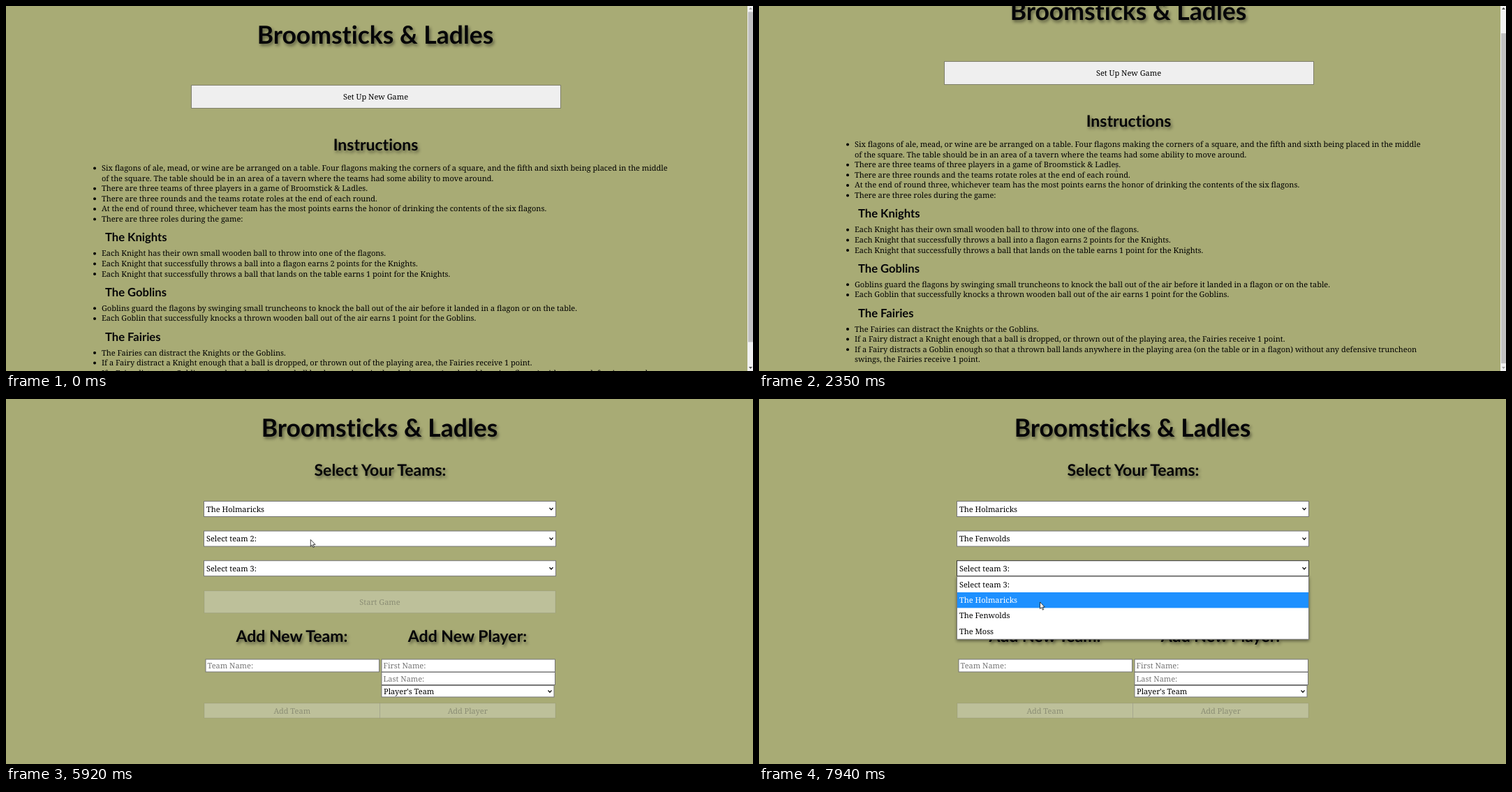
Recreate the animation shown at these times as an HTML page. Size 1070 by 523 pixels, loop 8000 ms.

```html
<!DOCTYPE html>
<html lang="en">
<head>
<meta charset="utf-8">
<title>Broomsticks &amp; Ladles</title>
<style>
html, body { margin: 0; width: 100%; height: 100%; overflow: hidden; background: #a8ab75; }
svg { display: block; width: 1070px; height: 523px; }
text { font: 11px "Noto Serif", serif; text-rendering: geometricPrecision; fill: #000; }
.mid { text-anchor: middle; }
.h1, .h2, .h3 { font: 700 35.5px Lato, sans-serif; font-variant-ligatures: none; fill: #050508; }
.h2 { font-size: 23px; }
.h3 { font-size: 16.6px; }
.h1, .h2 { text-anchor: middle; filter: drop-shadow(2px 3px 2px rgba(0, 0, 0, .45)); }
.hint { fill: #757575; }
.off { fill: #8b8d74; }
.lit { fill: #fff; }
.menu { filter: drop-shadow(0 2px 2px rgba(0, 0, 0, .45)); }
</style>
</head>
<body>
<svg id="stage" viewBox="0 0 1070 523"></svg>
<script>
const LOOP = 8000;
const stage = document.getElementById('stage');

const text = (x, y, s, cls = '') => `<text x="${x}" y="${y}" class="${cls}">${s}</text>`;
const rect = (x, y, w, h, fill, line = 'none') =>
  `<rect x="${x}" y="${y}" width="${w}" height="${h}" fill="${fill}" stroke="${line}"/>`;
const path = (d, attrs) => `<path d="${d}" ${attrs}/>`;

// [first baseline, lines]; a leading space marks a wrapped line without bullet
const sections = [
  [236, [
    'Six flagons of ale, mead, or wine are be arranged on a table. Four flagons making the corners of a square, and the fifth and sixth being placed in the middle',
    ' of the square. The table should be in an area of a tavern where the teams had some ability to move around.',
    'There are three teams of three players in a game of Broomstick &amp; Ladles.',
    'There are three rounds and the teams rotate roles at the end of each round.',
    'At the end of round three, whichever team has the most points earns the honor of drinking the contents of the six flagons.',
    'There are three roles during the game:']],
  [358.3, [
    'Each Knight has their own small wooden ball to throw into one of the flagons.',
    'Each Knight that successfully throws a ball into a flagon earns 2 points for the Knights.',
    'Each Knight that successfully throws a ball that lands on the table earns 1 point for the Knights.'],
    'The Knights'],
  [436.8, [
    'Goblins guard the flagons by swinging small truncheons to knock the ball out of the air before it landed in a flagon or on the table.',
    'Each Goblin that successfully knocks a thrown wooden ball out of the air earns 1 point for the Goblins.'],
    'The Goblins'],
  [500.5, [
    'The Fairies can distract the Knights or the Goblins.',
    'If a Fairy distract a Knight enough that a ball is dropped, or thrown out of the playing area, the Fairies receive 1 point.',
    'If a Fairy distracts a Goblin enough so that a thrown ball lands anywhere in the playing area (on the table or in a flagon) without any defensive truncheon',
    ' swings, the Fairies receive 1 point.'],
    'The Fairies']];

const rules = sections.map(([top, lines, head]) =>
  (head ? text(142, top - 21, head, 'h3') : '') +
  lines.map((s, i) => {
    const y = top + i * 14.6;
    const dot = s[0] === ' ' ? '' : `<circle cx="127" cy="${y - 3.5}" r="2"/>`;
    return dot + text(137, y, s.trim());
  }).join('')).join('');

const title = x => text(x, 54, 'Broomsticks &amp; Ladles', 'h1');

// Cursor moves: start, end, steps, x, y
const moves = [
  [460, 460, 1, 900, 443], [527, 860, 6, 545, 99], [930, 1060, 3, 524, 132],
  [1680, 1750, 2, 523, 157], [1840, 2000, 3, 512, 232],
  [3010, 3420, 7, 522, 92], [3900, 4110, 4, 522, 127], [4310, 4590, 5, 505, 156],
  [4910, 5300, 6, 448, 188], [5370, 5580, 4, 440, 206],
  [5720, 5930, 4, 435, 200], [6130, 6460, 6, 427, 258], [6540, 6730, 4, 425, 262],
  [7080, 7300, 4, 415, 243], [7540, 7870, 6, 403, 290], [7940, 7940, 1, 402.5, 291]];

function stepsDone(t, start, end, n) {
  if (t < start) return 0;
  return end > start ? Math.min(n, 1 + Math.floor((t - start) / (end - start) * (n - 1) + 1e-6)) : n;
}

function cursorAt(t) {
  let x = 900, y = 443;
  for (const [start, end, n, tx, ty] of moves) {
    const p = stepsDone(t, start, end, n) / n;
    x += (tx - x) * p;
    y += (ty - y) * p;
  }
  return [x, y];
}

function cursor(t, [x, y]) {
  if (t < 460) return '';
  const beam = t >= 1920 && t < 3100 || t >= 3630 && t < 4000;
  const shape = beam
    ? path('M-2-5Q0-5 0-4Q0-5 2-5M0-4V4M-2 5Q0 5 0 4Q0 5 2 5', 'fill="none" stroke="#555" stroke-width=".8"')
    : path('M0 0V9.6L2.2 7.6 3.8 11.2 5.3 10.5 3.7 7.1H6.8Z', 'fill="#fff" stroke="#111" stroke-width=".8"');
  return `<g transform="translate(${x.toFixed(1)} ${y.toFixed(1)})">${shape}</g>`;
}

function home(t, [x, y]) {
  const scroll = [0, 4.5, 17, 29.5, 34][stepsDone(t, 2140, 2350, 4)];
  const top = 113.5 - scroll;
  const hover = t >= 460 && x > 265 && x < 795 && y > top && y < top + 33;
  return `<g transform="translate(0 ${-scroll})">` + title(529) +
    rect(265.5, 113.5, 529, 33, hover ? '#e5e5e5' : '#efefef', '#80806c') +
    text(529.5, 134, 'Set Up New Game', 'mid') +
    text(529.5, 207, 'Instructions', 'h2') + rules + '</g>' +
    rect(1062, 0, 8, 523, '#f1f1f1') +
    rect(1063, 8.5 + scroll * .9, 7, 473, '#c1c1c1') +
    path('M1064 5l2.5-3 2.5 3z', `fill="${scroll ? '#505050' : '#a3a3a3'}"`) +
    path('M1064 517l2.5 3 2.5-3z', `fill="${scroll < 34 ? '#505050' : '#a3a3a3'}"`);
}

const teams = ['The Holmaricks', 'The Fenwolds', 'The Moss'];
// Open time, close time, chosen row, times at which the highlight moves down
const menus = [
  [4910, 5650, 1, [5450]],
  [6000, 6940, 2, [6330, 6540]],
  [7400, LOOP, 0, [7700]]];

const chevron = (x, y) => path(`M${x - 2.5} ${y - 1.5}l2.5 2.8 2.5-2.8`, 'fill="none" stroke="#111" stroke-width="1.3"');
const field = (x, y, label) => rect(x, y, 248.5, 18, '#fff', '#767676') + text(x + 2.5, y + 13, label, 'hint');
const disabled = (x, y, w, h, label) =>
  rect(x, y, w, h, 'rgba(239,239,239,.3)', 'rgba(118,118,118,.2)') +
  text(x + w / 2, y + h / 2 + 4, label, 'mid off');

function picker(t, i) {
  const [open, close, choice] = menus[i];
  const y = 146.5 + i * 42.6;
  const label = t >= close ? teams[choice - 1] : `Select team ${i + 1}:`;
  return rect(283.5, y, 504, 22, '#fff', t >= open && t < close ? '#333' : '#767676') +
    text(287, y + 15, label) + chevron(781, y + 11);
}

function dropdown(t, i) {
  const [open, close, , downs] = menus[i];
  if (t < open || t >= close) return '';
  const top = 168.5 + i * 42.8, row = 22.4;
  const active = downs.filter(d => t >= d).length;
  return '<g class="menu">' + rect(283.5, top, 504, 4 * row + .6, '#fff', '#777') + '</g>' +
    rect(284, top + .5 + active * row, 503, row, '#1e90ff') +
    [`Select team ${i + 1}:`, ...teams].map((s, r) =>
      text(287, top + 15.5 + r * row, s, r === active ? 'lit' : '')).join('');
}

function setup(t) {
  const each = draw => menus.map((_, i) => draw(t, i)).join('');
  return title(535) + text(536, 110, 'Select Your Teams:', 'h2') +
    each(picker) +
    disabled(284, 275, 503, 31.5, 'Start Game') +
    text(409.5, 348, 'Add New Team:', 'h2') + text(661, 348, 'Add New Player:', 'h2') +
    field(286, 373, 'Team Name:') + field(538, 373, 'First Name:') + field(538, 391.5, 'Last Name:') +
    rect(538, 410.5, 247, 16.5, '#fff', '#767676') + text(541, 422.7, "Player's Team") + chevron(779, 419) +
    disabled(284, 436, 251.5, 21, 'Add Team') + disabled(535.5, 436, 251.5, 21, 'Add Player') +
    each(dropdown);
}

let shown = '';
function frame(now) {
  const t = now % LOOP;
  const at = cursorAt(t);
  const view = (t < 3630 ? home(t, at) : setup(t)) + cursor(t, at);
  if (view !== shown) stage.innerHTML = shown = view;
  requestAnimationFrame(frame);
}
frame(0);
</script>
</body>
</html>
```
